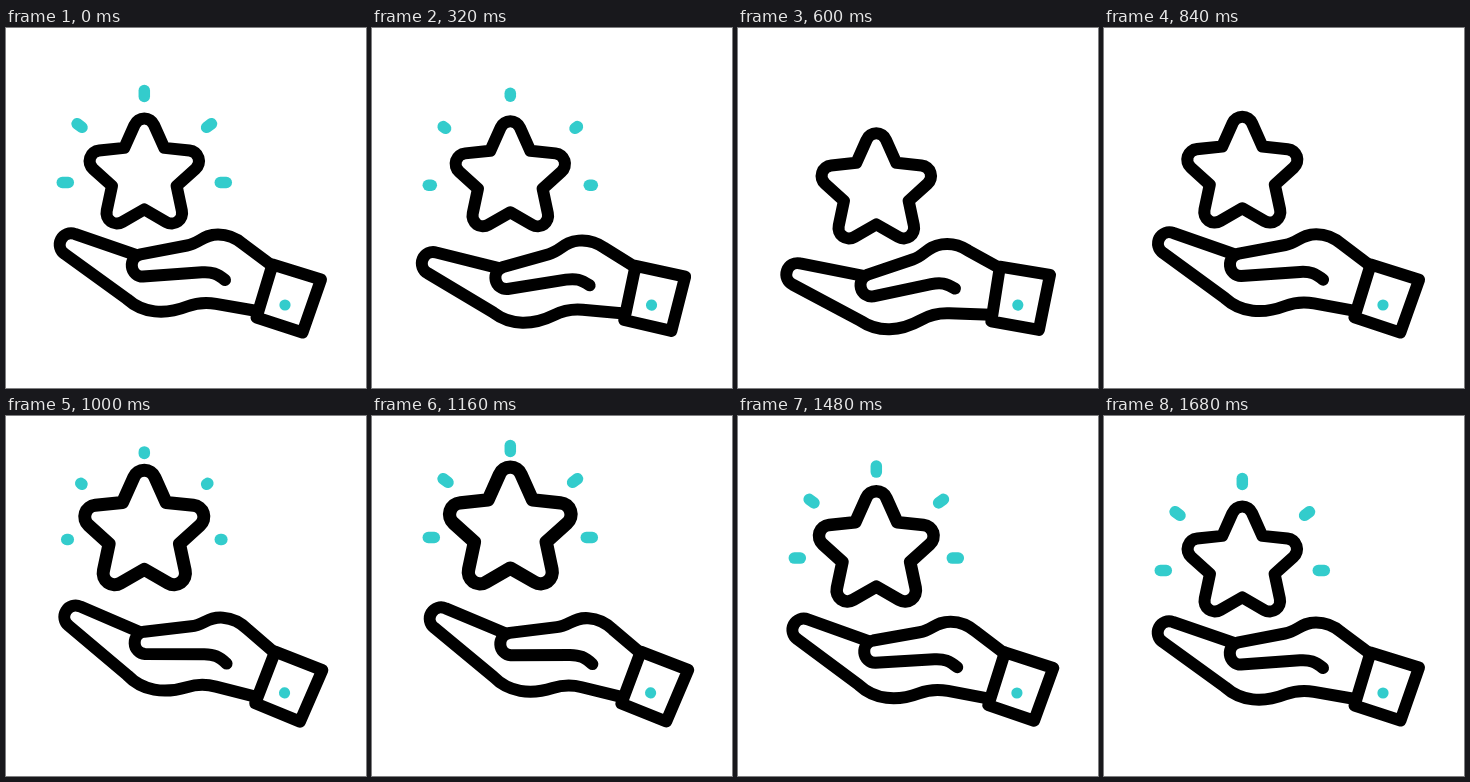
Write an HTML page that moves like this. It is 360x360 px and loops after 2000 ms.

```html
<!DOCTYPE html>
<html lang="en">
<head>
<meta charset="utf-8">
<title>Star on hand</title>
<style>
  html, body { margin: 0; width: 100%; height: 100%; overflow: hidden; background: #fff; }
  svg { display: block; width: 100%; height: 100%; }
</style>
</head>
<body>
<svg viewBox="0 0 360 360" fill="none" stroke="#000" stroke-width="12" stroke-linecap="round" stroke-linejoin="round">
  <g id="hand">
    <path d="M130 227L69 206A11.3 11.3 0 0 0 58.8 226L121 271C137 285.5 159 287 181 278.5C192 274.3 200 274 210 275.8L251 283"/>
    <path d="M219 252C211 245.5 206 243.700 196 244.300L137 248.600A11.300 11.300 0 0 1 134.500 226.300L181 217.500C194 215 197 206.500 212 206.500C222 206.500 230 210 237 216L266.500 238"/>
    <path d="M266.500 236.500L315 251.500L296.500 304.500L250.500 289.500Z"/>
    <circle cx="279" cy="277" r="5.6" fill="#3cc" stroke="none"/>
  </g>
  <g id="lift">
    <path id="star"/>
    <g id="rays" stroke="#3cc" stroke-width="11.5"></g>
  </g>
</svg>
<script>
const LOOP = 2000, STEP = 40;
const CX = 138.3, CY = 147.4;
const $ = id => document.getElementById(id);
const hand = $('hand'), lift = $('lift'), star = $('star');

const polar = (x, y, r, deg) => {
  const a = deg * Math.PI / 180;
  return [x + r * Math.cos(a), y + r * Math.sin(a)];
};

// Five round lobes joined at five sharp notches
function starPath() {
  const reach = 46.5, notch = 34, round = 10.5, spread = 67;
  let d = '';
  for (let i = 0; i < 5; i++) {
    const a = i * 72 - 90;
    const [x, y] = polar(CX, CY, reach, a);
    d += `${i ? 'L' : 'M'}${polar(x, y, round, a - spread)}`
      + `A${round} ${round} 0 0 1 ${polar(x, y, round, a + spread)}`
      + `L${polar(CX, CY, notch, a + 36)}`;
  }
  return d + 'Z';
}
star.setAttribute('d', starPath());

function makeRay(x, y, deg) {
  const el = document.createElementNS('http://www.w3.org/2000/svg', 'path');
  $('rays').append(el);
  return { el, x, y, deg };
}

// Each ray starts at its inner end; side rays come in mirrored pairs
const RAY = 6;
const rays = [makeRay(CX, 68.5, -90)];
for (const side of [-1, 1]) {
  rays.push(makeRay(CX + side * 62.3, 99.3, -90 + side * 54));
  rays.push(makeRay(CX + side * 76, 154.5, -90 + side * 90));
}

// Smooth 0 to 1 between times a and b
function ease(t, a, b) {
  const u = Math.min(1, Math.max(0, (t - a) / (b - a)));
  return u * u * (3 - 2 * u);
}

function drawRays(from, to) {
  for (const { el, x, y, deg } of rays) {
    el.setAttribute('d', `M${polar(x, y, RAY * from, deg)}L${polar(x, y, RAY * to, deg)}`);
    el.setAttribute('visibility', to - from > 0.01 ? 'visible' : 'hidden');
  }
}

function draw(t) {
  const tilt = -8.4 * ease(t, 40, 540) + 12.7 * ease(t, 540, 1020) - 4.3 * ease(t, 1020, 1640);
  const drop = 15.3 * ease(t, 200, 640) - 48.3 * ease(t, 710, 1040) + 33 * ease(t, 1200, 1680);
  const size = 1 + 0.11 * (ease(t, 800, 1080) - ease(t, 1240, 1680));
  hand.setAttribute('transform', `rotate(${tilt} 280 271)`);
  lift.setAttribute('transform', `translate(0 ${drop})`);
  star.setAttribute('transform', `translate(${CX} ${CY}) scale(${size}) translate(${-CX} ${-CY})`);
  if (t < 800) drawRays(ease(t, 80, 560), 1);
  else drawRays(0, ease(t, 920, 1160));
}

const start = performance.now();
function tick() {
  const t = (performance.now() - start) % LOOP;
  draw(Math.floor(t / STEP) * STEP);
  requestAnimationFrame(tick);
}
tick();
</script>
</body>
</html>
```
